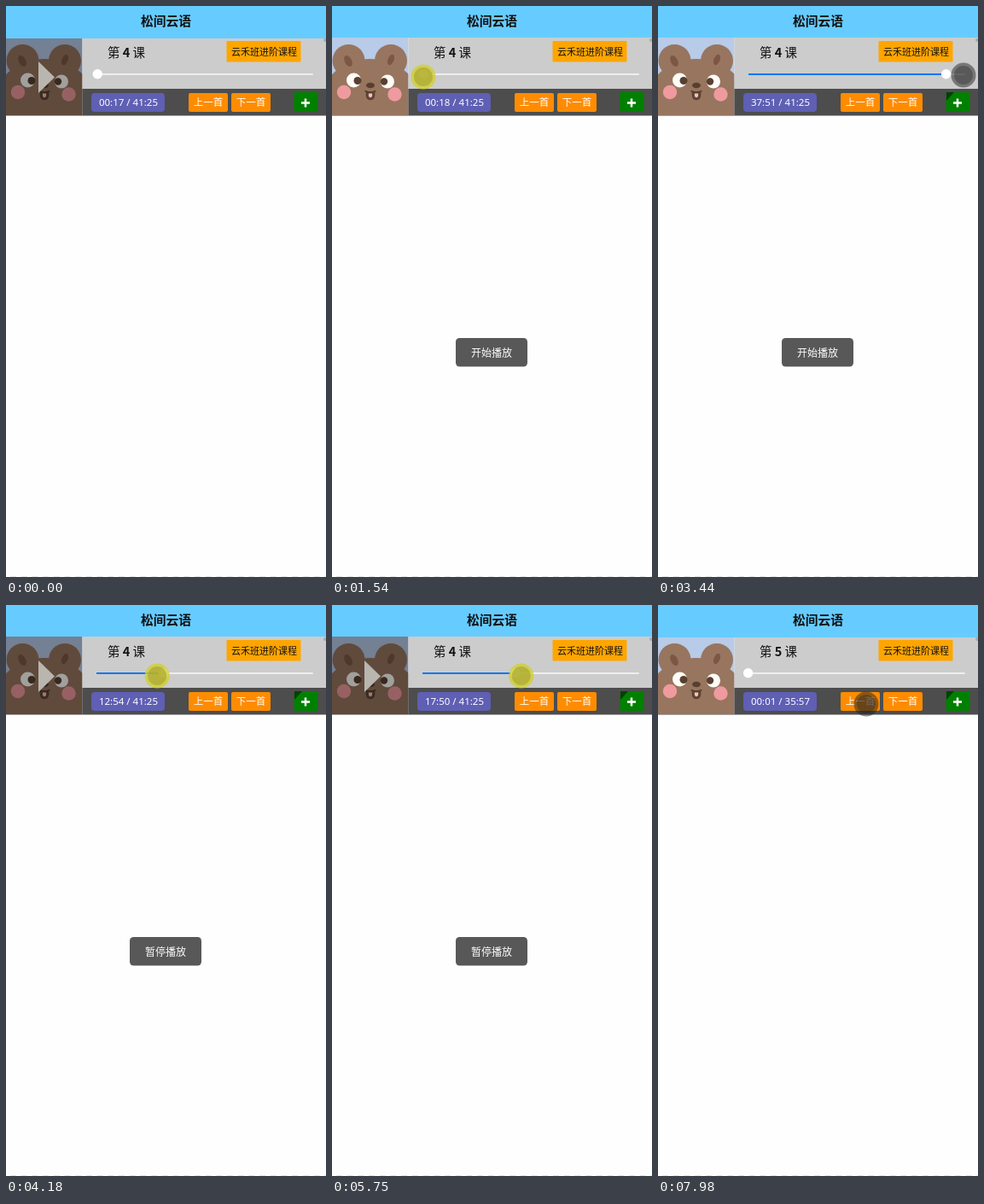
These frames come from a looping animation (375 px wide and 669 px high, 8 s). An HTML page:

```html
<!DOCTYPE html>
<html lang="zh-CN">
<head>
<meta charset="utf-8">
<style>
html, body { margin: 0; width: 100%; height: 100%; overflow: hidden; background: #fefefe; }
svg { display: block; width: 375px; height: 669px; }
text { font: 500 11.5px "Noto Sans CJK SC", "Noto Sans CJK", sans-serif; text-anchor: middle; fill: #fff; }
.dark { fill: #111; }
#title { font-size: 14.75px; font-weight: 600; }
#heading { font-size: 14.5px; }
#tag { font-size: 11px; font-weight: 400; }
#time { font-family: "Noto Sans", sans-serif; }
#toastText { font-size: 12px; }
</style>
</head>
<body>
<svg viewBox="0 0 375 669">
  <rect width="375" height="669" fill="#fefefe"/>
  <path d="M5 668.5H375" stroke="#e4e4e4" stroke-dasharray="7 5.7"/>

  <!-- cover -->
  <clipPath id="coverClip"><rect y="37" width="89.5" height="91.5"/></clipPath>
  <g clip-path="url(#coverClip)">
    <rect y="37" width="90" height="92" fill="#b8cbe8"/>
    <g fill="#98755f">
      <circle cx="19.5" cy="64" r="19"/><circle cx="69" cy="64" r="19"/>
      <ellipse cx="45" cy="116" rx="60" ry="54"/>
    </g>
    <g fill="#7b5744">
      <ellipse cx="19" cy="64.5" rx="4" ry="7" transform="rotate(-28 19 64.5)"/>
      <ellipse cx="69" cy="63" rx="3.5" ry="6.5" transform="rotate(22 69 63)"/>
    </g>
    <g fill="#fffdf8"><circle cx="25.5" cy="87" r="8.5"/><circle cx="65" cy="88.5" r="8"/></g>
    <g fill="#57402f">
      <circle cx="30" cy="87.5" r="4.5"/><circle cx="61" cy="88.5" r="4.2"/>
      <ellipse cx="45" cy="93" rx="5" ry="3.2"/>
    </g>
    <g fill="#ef9a9e"><circle cx="14" cy="101" r="8.2"/><circle cx="73.5" cy="103.5" r="8.2"/></g>
    <g stroke="#57402f" stroke-width="1.5">
      <path d="M40.5 101V105Q41 109.500 45 109.500T49.500 105V101Z" fill="#6b4a3c"/>
      <path d="M38.500 99.500Q45 102.500 51.500 99.500" fill="none"/>
    </g>
    <path d="M43 102.5v3q2 3.500 4 0v-3" fill="#f3c4c0"/>
    <g id="pausedCover">
      <rect y="37" width="90" height="92" opacity=".37"/>
      <path d="M38 65L57 83.500L38 102Z" fill="#b9b5af"/>
    </g>
  </g>

  <!-- player panel -->
  <rect x="89.500" y="37" width="286" height="60" fill="#ccc"/>
  <rect x="89.500" y="97" width="286" height="31" fill="#4d4d4d"/>
  <path d="M0 128.500H375" stroke="#a5a5a5"/>
  <circle cx="374" cy="40" r="2" fill="#aaa"/>
  <rect id="header" width="375" height="38" fill="#6cf"/>
  <text id="title" class="dark" x="187.500" y="23">松间云语</text>
  <text id="heading" class="dark" x="141" y="59.500">第 <tspan id="lesson" font-weight="700">4</tspan> 课</text>
  <rect x="258.500" y="41" width="87" height="24.500" rx="1" fill="#ffa500"/>
  <text id="tag" class="dark" x="302.500" y="58.200">云禾班进阶课程</text>

  <rect x="106" y="79" width="254" height="2" rx="1" fill="#eee"/>
  <rect id="fill" x="106" y="79" height="2" fill="#0d76f5"/>
  <circle id="thumb" cy="79.800" r="5.700" fill="#fff"/>

  <rect x="100" y="102" width="86" height="22" rx="4" fill="#5f5fb4"/>
  <text id="time" x="143.500" y="117.200"></text>
  <g fill="#ff8c00">
    <rect x="214" y="102" width="46" height="22" rx="2"/>
    <rect x="264" y="102" width="46" height="22" rx="2"/>
  </g>
  <text x="237" y="117.400">上一首</text>
  <text x="287" y="117.400">下一首</text>
  <rect x="337.500" y="101" width="28" height="23" rx="1" fill="#008000"/>
  <path id="corner" d="M338 101h9l-9 10z" fill="#063f06"/>
  <path d="M346 113.500h10M351 108.500v10" stroke="#fff" stroke-width="2.500"/>

  <g id="toast">
    <rect x="145" y="389" width="84" height="33.500" rx="4.500" fill="#585858"/>
    <text id="toastText" x="187" y="411"></text>
  </g>

  <g id="cursor">
    <circle id="ring" r="14.500"/>
    <circle id="dot" r="11"/>
  </g>
</svg>
<script>
const LOOP = 8000, FIRST_PLAY = 1080, NEXT_TRACK = 6840;
const LESSON_4 = 41 * 60 + 25, LESSON_5 = 35 * 60 + 57;

const el = id => document.getElementById(id);
const set = (id, attrs) => { for (const k in attrs) el(id).setAttribute(k, attrs[k]); };
const show = (id, on) => set(id, { visibility: on ? "visible" : "hidden" });
const clamp = v => Math.max(0, Math.min(1, v));
const lerp = (a, b, u) => a + (b - a) * u;
const easeOut = u => 1 - (1 - u) ** 2;
const clock = s => [s / 60, s % 60].map(n => String(Math.floor(n)).padStart(2, "0")).join(":");
const thumbX = (seconds, total) => 105.5 + 254 * seconds / total;

// The pointer either travels to a place or drags the thumb to a playback time.
const go = (start, end, x, y) => ({ start, end, x, y });
const drag = (start, end, release, seconds) =>
  ({ start, end, release, seconds, x: thumbX(seconds, LESSON_4), y: 83 });
const steps = [
  go(140, 940, 42, 84),
  go(1410, 1520, 107, 83),
  drag(1620, 2513, 2900, 37 * 60 + 51),
  go(3050, 3200, 284, 95),
  go(3200, 3440, 358, 81),
  go(3580, 3650, 338, 83),
  drag(3660, 4530, 4750, 8 * 60 + 8),
  go(4750, 4930, 150.5, 93),
  go(5200, 5480, 155, 83),
  drag(5560, 6120, 6200, 25 * 60 + 17),
  go(6200, 6300, 274.5, 117.5),
  go(7360, 7560, 244, 116)
];
const clicks = [1010, 6770], CLICK_LENGTH = 130, GRAB_LEAD = 100, POINTER_LEAD = 8;

function stateAt(t) {
  const s = { x: 257, y: 514, seconds: t < 1450 ? 17 : 18, total: LESSON_4 };
  s.paused = t < FIRST_PLAY;
  s.pressed = clicks.some(c => t >= c && t < c + CLICK_LENGTH);
  for (const step of steps) {
    if (t < step.start - GRAB_LEAD) break;
    const u = clamp((t - step.start) / (step.end - step.start)), e = easeOut(u);
    if (step.release) {
      s.lead = Math.sign(step.seconds - s.seconds) * POINTER_LEAD * Math.sin(Math.PI * u);
      s.seconds = lerp(s.seconds, step.seconds, e);
      s.paused ||= t >= step.start && t < step.release;
      s.pressed ||= t < step.release;
    } else s.lead = 0;
    s.x = lerp(s.x, step.x, e) + s.lead;
    s.y = lerp(s.y, step.y, e);
  }
  if (t >= NEXT_TRACK) {
    s.total = LESSON_5;
    s.seconds = t < 7560 ? 0 : 1;
  }
  return s;
}

function draw(t) {
  const { x, y, seconds, total, paused, pressed } = stateAt(t);
  const thumb = thumbX(seconds, total);
  el("time").textContent = clock(seconds) + " / " + clock(total);
  el("lesson").textContent = total === LESSON_5 ? 5 : 4;
  set("thumb", { cx: thumb });
  set("fill", { width: Math.max(0, thumb - 106) });

  show("pausedCover", paused);
  el("toastText").textContent = paused ? "暂停播放" : "开始播放";
  const toast = clamp((t - FIRST_PLAY) / 130) * clamp((7620 - t) / 200);
  set("toast", { opacity: toast });
  set("header", { height: toast ? 37 : 38 });
  show("corner", t >= 3320);

  show("cursor", t >= 140);
  set("cursor", { transform: `translate(${x} ${y})` });
  set("ring", { fill: pressed ? "rgba(208,208,50,.8)" : "rgba(34,34,34,.5)" });
  set("dot", { fill: pressed ? "rgba(165,160,45,.6)" : "rgba(34,34,34,.35)" });
}

function tick() {
  draw(performance.now() % LOOP);
  requestAnimationFrame(tick);
}
tick();
</script>
</body>
</html>
```
